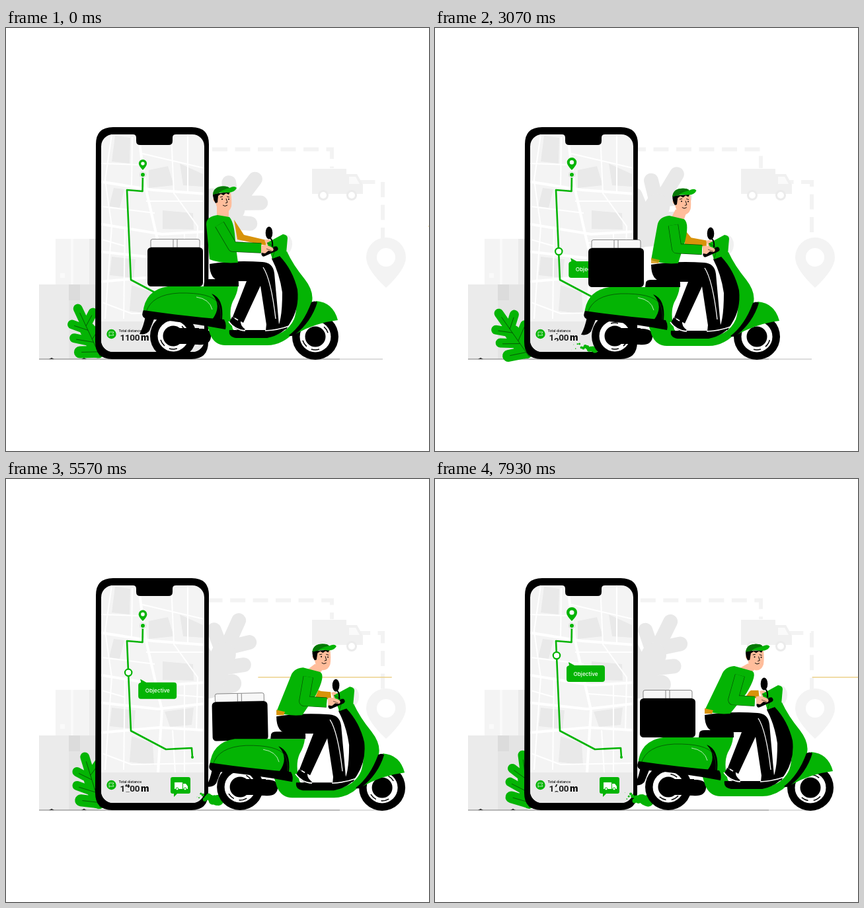
An HTML page that plays this animation: 640 px wide and 640 px high, repeating every 8 s.

```html
<!DOCTYPE html>
<html lang="en">
<head>
<meta charset="utf-8">
<title>Delivery scooter</title>
<style>
  html, body { margin: 0; width: 100%; height: 100%; overflow: hidden; background: #fff; }
  svg { display: block; width: 100vw; height: 100vh; }
  .g { fill: #04b404; }
  .skin { fill: #ffbd9b; }
  .ochre { fill: #d8930a; }
  .line { fill: none; stroke: #064d06; stroke-width: .8; }
  .dash { fill: none; stroke: #f3f3f3; stroke-width: 6; stroke-dasharray: 23 11.5; }
  .leaf { fill: none; stroke-linecap: round; stroke-linejoin: round; }
  .digit { font: 700 13.5px Roboto, sans-serif; fill: #1c1c1c; }
</style>
</head>
<body>
<svg viewBox="0 0 640 640">
  <defs>
    <clipPath id="screen"><rect x="144" y="161" width="156" height="329" rx="18"/></clipPath>
    <clipPath id="slot"><rect x="180" y="462" width="8" height="11.5"/></clipPath>
    <g id="leaf" class="leaf">
      <path stroke-width="14" d="M0-6V-81M0-45L-18-63M0-52L18-66M0-25L-24-43M0-30L22-44"/>
      <path stroke-width="18" d="M0-9L-25-20M0-9L19-23"/>
      <path stroke-width="24" d="M0-12V-45"/>
    </g>
    <g id="wheel">
      <circle r="35"/>
      <circle r="23.5" fill="#fff"/>
      <circle r="15.5"/>
    </g>
    <path id="marks" fill="none" stroke="#000" stroke-width="1.5" d="M-19 6A20 20 0 0 0-13 15M19-6A20 20 0 0 0 13-15M-6 19A20 20 0 0 0 6 19"/>
  </defs>

  <!-- backdrop -->
  <path class="dash" id="dashTop" d="M305 183.500H493V212"/>
  <path class="dash" id="dashSide" d="M536 233H570V318"/>
  <path fill="#f3f3f3" fill-rule="evenodd" d="M575 393Q545 365 545 347A30 30 0 0 1 605 347Q605 365 575 393ZM561 347A14 14 0 0 0 589 347A14 14 0 0 0 561 347Z"/>
  <g fill="#f0f0f0">
    <path d="M463 213H515V221H531L540 237V251H463Z"/>
    <path fill="#fafafa" d="M519 225H529L535 236H519Z"/>
    <g fill="#fff" stroke="#ebebeb" stroke-width="3"><circle cx="480" cy="253" r="6.500"/><circle cx="523" cy="253" r="6.500"/></g>
  </g>
  <path fill="#f4f4f4" d="M75 319H140V388H75Z"/>
  <path fill="#ebebeb" d="M126 319H140V388H126Z"/>
  <path fill="#fafafa" d="M82 371H89V378H82ZM98 319H102V388H98Z"/>
  <path fill="#ebebeb" d="M50 388H140V501H50Z"/>
  <path fill="#e4e4e4" d="M95 388H140V501H95Z"/>
  <path fill="#dcdcdc" d="M95 388H112V412H95Z"/>
  <path d="M65 501L69 499L73 501ZM114 501L118 499L122 501Z"/>
  <path stroke="#777" d="M50 501H505"/><path stroke="#bbb" d="M505 501H570"/>
  <g id="greyLeaf"><use href="#leaf" stroke="#e8e8e8"/></g>
  <g id="plant">
    <use href="#leaf" stroke="#04b404"/>
    <path class="line" d="M0 0V-74M0-45L-16-60M0-52L15-63M0-25L-22-40M0-30L20-42M0-9L-23-19"/>
  </g>

  <!-- phone -->
  <path d="M162 150H281Q307 150 307 176L306 475Q306 501 280 501H161Q135 501 135 475L136 176Q136 150 162 150Z"/>
  <g clip-path="url(#screen)">
    <path fill="#f4f4f4" d="M144 161H300V490H144Z"/>
    <path fill="#e9e9e9" d="M165 163L188 166L187 205L160 202ZM216 215L245 209L254 238L216 242ZM263 205L298 221V240L268 238ZM237 276L283 280L284 305L237 304ZM163 242L179 244L172 272L156 270ZM160 346L196 350L193 378L157 374ZM240 352L284 346L281 372L248 375ZM190 389L222 400L224 433L187 428Z"/>
    <g fill="none" stroke="#fff">
      <path stroke-width="4" d="M140 232L222 245L302 251M200 160L212 245L236 350L230 444M140 296L236 312L302 308M140 384L232 376L302 380M300 340L230 348L140 338"/>
      <path stroke-width="2" d="M160 161L150 230L160 300L150 440M191 165L190 240M144 205L206 207M206 190L300 212M250 161L254 250L290 300L288 380M275 161V250M212 262H300M180 300L178 440M145 270L225 280M232 325L300 330M270 310V444M145 415L190 432L300 430M145 320L180 330M252 380L256 444"/>
    </g>
    <path fill="#e9e9e9" d="M144 444H300V490H144Z"/>
  </g>
  <path d="M192 155H257V161Q252 161 252 166V171Q252 177 246 177H203Q197 177 197 171V166Q197 161 192 161Z"/>
  <path fill="none" stroke="#04b404" stroke-width="2.600" stroke-linejoin="round" d="M207 222L206.500 247L183 245L189 381L242 409L281 407L282 421"/>
  <circle class="g" cx="282" cy="421" r="2"/>
  <circle cx="207" cy="222" r="4.500" fill="#fff" stroke="#999" stroke-width=".7" stroke-dasharray="1 1"/>
  <circle class="g" cx="207" cy="222" r="3"/>
  <path id="pin" class="g" fill-rule="evenodd" d="M0 0Q-9-9-9-14.500A9 9 0 0 1 9-14.500Q9-9 0 0ZM-4-14.500A4 4 0 0 0 4-14.500A4 4 0 0 0-4-14.500Z"/>
  <g id="marker">
    <circle r="5.200" fill="#fff" stroke="#04b404" stroke-width="2.200"/>
    <path class="g" d="M18 10L27 15H69Q73 15 73 19V36Q73 40 69 40H19Q15 40 15 36V19Q15 16 19 15Z"/>
    <text x="25.500" y="30.500" fill="#fff" font-family="Inter, sans-serif" font-size="8.200" font-weight="500">Objective</text>
  </g>
  <circle class="g" cx="159.500" cy="463" r="7.200"/>
  <path fill="none" stroke="#fff" stroke-width=".7" d="M156 467V460H163L161.500 462.500L163 465H156"/>
  <text x="170.500" y="460" font-family="Inter, sans-serif" font-size="5.200" font-weight="500">Total distance</text>
  <text class="digit" x="172.500" y="472.500">1</text>
  <g clip-path="url(#slot)"><g id="reel" class="digit"></g></g>
  <text class="digit" x="187.300" y="472.500">0</text>
  <text class="digit" x="194.800" y="472.500">0</text>
  <text x="204" y="472.500" font-family="Inter, sans-serif" font-size="13.500" font-weight="800">m</text>
  <path class="g" d="M252 451H276Q279 451 279 454V473Q279 476 276 476H259L254 481V476H252Q249 476 249 473V454Q249 451 252 451Z"/>
  <path fill="#fff" d="M255 459H267V469H255ZM268 461H272L275 465V469H268Z"/>
  <g fill="#fff" stroke="#04b404"><circle cx="259" cy="469" r="2"/><circle cx="271" cy="469" r="2"/></g>

  <path id="windDark" stroke="#888"/>
  <path id="windOchre" stroke="#ecd08a" stroke-width="1.300"/>
  <g id="smoke" class="g"></g>

  <g id="scooter">
    <path d="M253 455H296Q312 456 310 468Q308 481 290 479L253 478Z"/>
    <use href="#wheel" x="253" y="466"/>
    <use href="#wheel" x="468" y="467"/>
    <g class="spin" data-at="253 466"><use href="#marks"/></g>
    <g class="spin" data-at="468 467"><use href="#marks"/></g>
    <path d="M253 454H292V478H253Z"/>
    <g id="body">
      <g id="box">
        <path fill="#f7f7f7" stroke="#555" stroke-width=".7" d="M219 332V322Q219 319.500 222 319.500H290Q293 319.500 293 322V332ZM253 332V320M259 332V320"/>
        <rect x="214" y="332" width="84" height="59" rx="5.500"/>
      </g>
      <path d="M211 436Q208 452 202 463Q212 465 217 458L225 438Z"/>
      <ellipse cx="424" cy="327" rx="9" ry="14" fill="#f0f0f0"/>
      <!-- frame -->
      <path class="g" d="M207 432Q210 396 245 391H351Q350 402 343 414Q336 430 343 455Q350 468 390 468Q425 465 436 440Q446 410 428 372L402 348L425 338Q434 358 452 380Q466 398 463 414Q460 438 440 456Q420 480 395 480H332Q316 480 309 464L304 448Z"/>
      <path d="M402 349L414 345Q434 366 441 396Q444 424 430 446Q420 464 395 469H348Q336 467 338 457H408Q418 448 418 400Q414 372 402 349Z"/>
      <path d="M300 384Q301 380 308 380H347Q352 380 352 385V391H299Z"/>
      <path d="M311 402Q330 409 327 441H312Q328 420 311 402Z"/>
      <path class="line" d="M212 430Q220 403 262 401Q310 400 321 416Q326 426 325 440"/>
      <path fill="none" stroke="#b9edb9" d="M288 407Q308 410 312 426"/>
      <path d="M208 427Q270 436 330 441Q334 448 332 456Q270 444 212 440Q203 437 208 427Z"/>
      <path class="g" d="M438 463Q460 430 469 413Q495 415 502 442Q468 446 438 463Z"/>
      <path d="M462 415Q467 412 471 415Q462 445 436 465Q430 467 428 465Q450 448 462 415Z"/>
      <!-- legs -->
      <path d="M308 357Q345 351 388 354Q404 355 406 371L413 449L394 449L385 390L359 446L343 437L364 383H325Q308 381 308 357Z"/>
      <path d="M342 437L355 443Q354 450 362 456L356 459Q345 456 338 445ZM394 448H410Q418 450 427 451L424 456L393 458Z"/>
      <path fill="none" stroke="#fff" stroke-width="1.600" d="M337 444Q346 457 362 458M392 458Q412 457 428 451M346 439L351 442"/>
      <path fill="none" stroke="#fff" stroke-width="1.300" d="M389 362Q401 380 408 440"/>
      <!-- rider -->
      <path id="farArm" class="ochre"/>
      <path class="skin" d="M391 321Q399 318 403 325L395 331Z"/>
      <path class="g" d="M395 325L419 312Q426 313 426 318L424 341L403 349Z"/>
      <path class="line" d="M395 325L408 332L403 349"/>
      <ellipse cx="398" cy="310" rx="5.300" ry="9.500"/>
      <path fill="none" stroke="#000" stroke-width="2" d="M400 318Q404 322 403 331"/>
      <path stroke="#000" stroke-width="7" stroke-linecap="round" d="M390 342L408 334"/>
      <path id="neck" class="skin"/>
      <path id="torso" class="g"/>
      <path class="ochre" id="hem" d="M308 347L321 350L319 355H308Z"/>
      <path id="armEdge" fill="none" stroke="#064d06" stroke-width="15.400" stroke-linejoin="round"/>
      <path id="arm" fill="none" stroke="#04b404" stroke-width="14" stroke-linejoin="round"/>
      <path class="skin" d="M386 329Q395 327 404 333Q406 337 402 338L397 337L392 341L386 340Z"/>
      <path fill="none" stroke="#000" stroke-width=".6" d="M394 334L402 337"/>
      <g id="head">
        <path class="skin" d="M317 251L340 249Q342 262 341 270Q338 280 329 279Q319 276 317 264Q312 262 314 257Z"/>
        <path d="M313 251L339 248L337 252L333 250L329 253L325 251L321 254L320 264L317 265Q313 259 313 251Z"/>
        <path class="g" d="M313 252Q314 240 328 239.500Q335 239 338 242Q346 238 349 242Q346 249 336 249Q325 248 313 252Z"/>
        <path fill="#057805" d="M313 252Q314 240 328 239.500Q336 239 338 242Q326 245 322 250Z"/>
        <g fill="none" stroke="#000" stroke-width=".9">
          <path d="M324 256L328 255M334 255L338 256M333 258L335 264L332 265M328 268Q331 271 335 268"/>
        </g>
        <circle cx="327" cy="259" r="1"/><circle cx="337" cy="259" r="1"/>
      </g>
    </g>
  </g>
</svg>
<script>
const LOOP = 8000;
const $ = id => document.getElementById(id);
const clamp = (v, lo, hi) => Math.min(hi, Math.max(lo, v));
const set = (id, name, value) => $(id).setAttribute(name, value);

// Smooth curve through [time, value] keys
function curve(...keys) {
  const slope = i => {
    const a = keys[Math.max(0, i - 1)], b = keys[Math.min(keys.length - 1, i + 1)];
    return (b[1] - a[1]) / (b[0] - a[0]);
  };
  return t => {
    let i = 0;
    while (i < keys.length - 2 && t > keys[i + 1][0]) i++;
    const [t0, a] = keys[i], [t1, b] = keys[i + 1], d = t1 - t0;
    const u = clamp((t - t0) / d, 0, 1), u2 = u * u, u3 = u2 * u;
    return a * (2 * u3 - 3 * u2 + 1) + b * (3 * u2 - 2 * u3)
      + d * (slope(i) * (u3 - 2 * u2 + u) + slope(i + 1) * (u3 - u2));
  };
}

const rideX = curve([0, 0], [1210, 7], [2570, 17], [3070, 19], [4000, 35], [4930, 80], [6210, 113], [7930, 100]);
const bodyY = curve([0, 0], [1210, 1.2], [3070, 1], [4000, 2], [6210, 2], [7930, 0]);
const boxTurn = curve([0, 0], [1210, 0], [3070, 0], [4000, -6], [4930, -1.5], [6210, -1.5], [7930, 0]);
const boxX = curve([0, 0], [3070, -1], [4000, -3], [6210, -3], [7930, -4]);
const boxY = curve([0, 0], [3070, 0], [4000, -1], [4930, 2], [6210, 2.5], [7930, 0]);
const lean = curve([0, 0], [1210, 0], [3070, .54], [4000, .97], [4930, .97], [6210, 1], [7930, 1.13]);
const plantTurn = curve([0, -25], [860, -36], [1700, -39], [2640, -37.5], [3070, -35], [4000, -29.7], [4930, -23], [6210, -12], [7930, -7.5]);
const greyTurn = curve([0, 37.2], [1210, 36], [3070, 31.2], [4000, 28.6], [4930, 25.8], [6210, 23.4], [7930, 26.2]);
const pinSize = curve([0, 16], [900, 25], [1210, 23], [1790, 21], [2640, 21.5], [3070, 19], [4000, 18], [4930, 17], [6900, 17], [7930, 21]);
const markerY = curve([0, 360], [1210, 354], [3070, 338], [4000, 323], [4930, 303], [6210, 284.5], [7930, 267]);
const digit = curve([0, 1], [1210, 1], [3070, 1.6], [4000, 2.5], [4930, 3.6], [6210, 5.1], [7930, 7.45]);

const poses = {
  torso: ["M320 283Q303 285 303 297L308 350Q325 357 351 355L347 325Q346 295 338 286Z",
          "M349 283Q334 284 330 297L308 350Q325 357 347 355L368 325Q384 295 375 290Z"],
  farArm: ["M345 290L360 313L394 321L393 329L350 320Z",
           "M372 318L376 319L390 320L391 331L366 331Z"],
  arm: ["M323 297L343 331L386 333", "M357 297L350 334L384 336"],
  neck: ["M319 268L319 284Q327 293 337 285L337 270Z", "M367 278L356 286Q362 296 376 290L384 280Z"]
};
poses.armEdge = poses.arm;

function mix([a, b], k) {
  const ends = b.match(/\d+/g);
  let i = 0;
  return a.replace(/\d+/g, v => (+v + (ends[i++] - v) * k).toFixed(2));
}

const svgEl = (name, parent) => parent.appendChild(document.createElementNS("http://www.w3.org/2000/svg", name));
const STEP = 15;
for (let d = 1; d <= 9; d++) {
  const text = svgEl("text", $("reel"));
  text.textContent = d;
  text.setAttribute("x", 180);
  text.setAttribute("y", 472.5 + STEP * (d - 1));
}
const PUFFS = 13, LIFE = 1050;
const puffs = Array.from({ length: PUFFS }, () => svgEl("circle", $("smoke")));

function wind(id, y, t, start, period) {
  const age = ((t - start) % period + period) % period;
  const on = t >= start && age < 460;
  const reach = a => 640 - .0013 * Math.max(0, a) ** 2;
  set(id, "d", on ? `M${reach(age)} ${y}H${reach(age - 238)}` : "");
}

function smoke(t, x) {
  const power = clamp((t - 2600) / 900, 0, 1);
  puffs.forEach((puff, i) => {
    const age = (t + i * LIFE / PUFFS) % LIFE / LIFE;
    puff.setAttribute("cx", x + 223 - 38 * age);
    puff.setAttribute("cy", 487 - 15 * age * Math.abs(Math.sin(i * 2.3)));
    puff.setAttribute("r", 9 * power * (1 - age) ** 1.2);
  });
}

function draw(t) {
  const x = rideX(t), k = lean(t), y = markerY(t);
  set("scooter", "transform", `translate(${x})`);
  set("body", "transform", `translate(0 ${bodyY(t)})`);
  set("box", "transform", `translate(${boxX(t)} ${boxY(t)}) rotate(${boxTurn(t)} 256 361)`);
  for (const id in poses) set(id, "d", mix(poses[id], k));
  set("head", "transform", `translate(${50 * k} ${8 * k * k}) rotate(${3 * k} 327 260)`);
  set("hem", "opacity", clamp(k * 1.5, 0, 1));
  document.querySelectorAll(".spin").forEach(w =>
    w.setAttribute("transform", `translate(${w.dataset.at}) rotate(${t * .45})`));

  set("plant", "transform", `translate(143 498) rotate(${plantTurn(t)})`);
  set("greyLeaf", "transform", `translate(300 330) rotate(${greyTurn(t)}) scale(1.57)`);
  set("pin", "transform", `translate(207 215) scale(${pinSize(t) / 23.5})`);
  set("marker", "transform", `translate(${184 + (y - 267) * .046} ${y})`);
  set("marker", "opacity", clamp((t - 800) / 500, 0, 1));
  set("reel", "transform", `translate(0 ${-STEP * (digit(t) - 1)})`);

  const flow = 34.5 * t / 2000;
  set("dashTop", "stroke-dashoffset", -7 - flow);
  set("dashSide", "stroke-dashoffset", .5 - flow);
  wind("windDark", 247.5, t, 892, 2496);
  wind("windOchre", 300, t, -25, 2575);
  smoke(t, x);
}

const begin = performance.now();
function tick() {
  draw((performance.now() - begin) % LOOP);
  requestAnimationFrame(tick);
}
tick();
</script>
</body>
</html>
```
